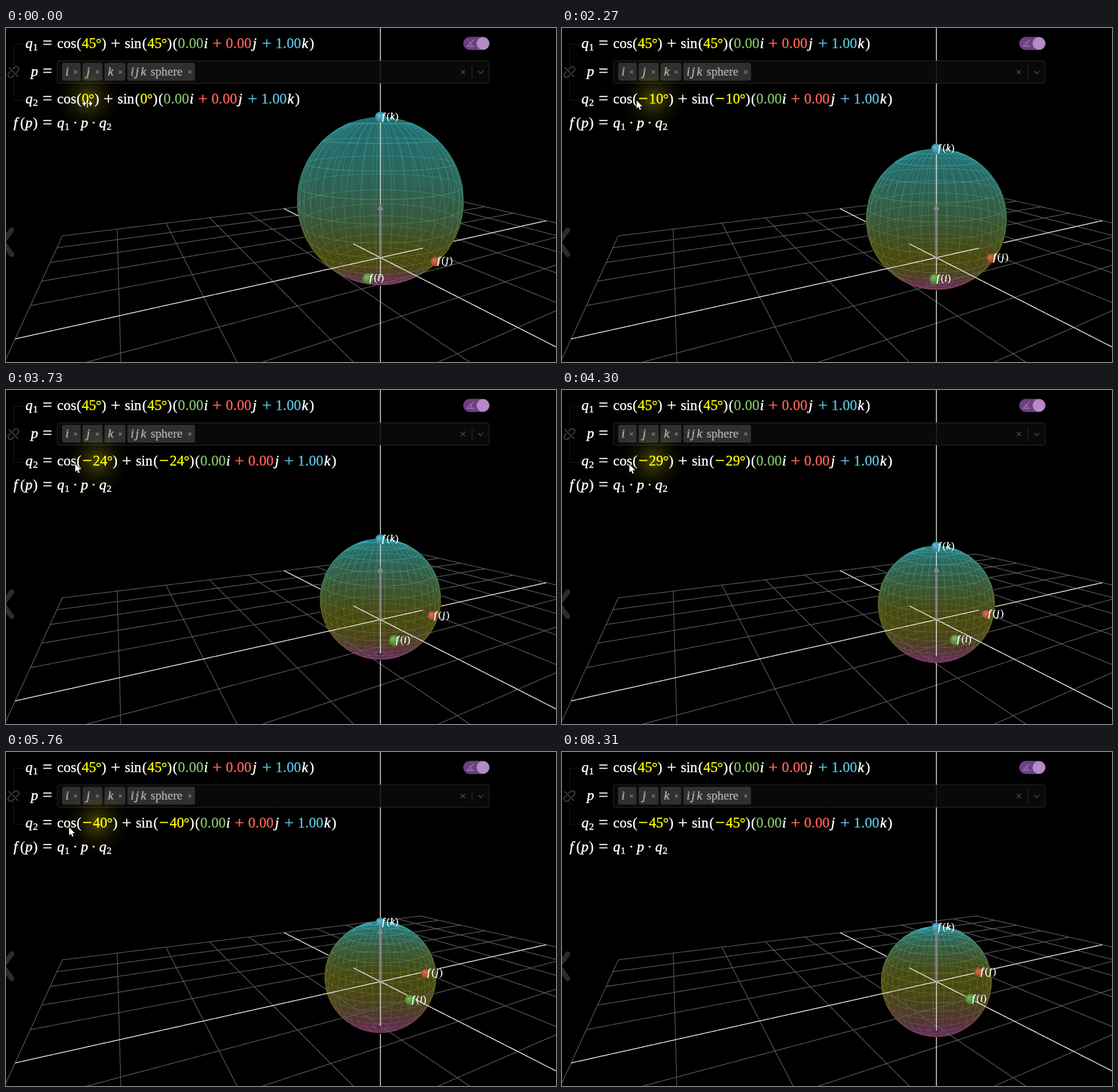
An HTML page with a canvas for the animation above (9060 ms loop, 960 px wide and 584 px high).

```html
<!DOCTYPE html>
<html lang="en">
<head>
<meta charset="utf-8">
<title>Quaternion product on a sphere</title>
<style>
html, body { margin: 0; width: 100%; height: 100%; overflow: hidden; background: #000; }
canvas { display: block; }
</style>
</head>
<body>
<canvas id="stage" width="960" height="584"></canvas>
<script>
const ctx = document.getElementById('stage').getContext('2d');
const LOOP = 9060, LEAVE = 7320, GONE = 8310;
const TAU = Math.PI * 2, RAD = Math.PI / 180;
const SERIF = '"Liberation Serif", serif';
const YELLOW = '#ffff00', GREEN = '#83c167', RED = '#fc6255', BLUE = '#58c4dd', WHITE = '#fff';

const mix = (a, b, u) => a + (b - a) * u;

// The drag: time and degrees turned so far
const DRAG = [[50, 0], [330, 3], [1130, 3], [2270, 10], [3020, 18], [4300, 29], [4910, 35], [6570, 45]];

function turnedAt(t) {
  const k = DRAG.findIndex(key => key[0] > t);
  if (k < 0) return 45;
  if (k === 0) return 0;
  const [t0, d0] = DRAG[k - 1], [t1, d1] = DRAG[k];
  return mix(d0, d1, (t - t0) / (t1 - t0));
}

function pointerAt(t, turned) {
  const x = 137 - turned * 2 / 3, y = 125 + turned * 0.17;
  const u = Math.max(0, Math.min(1, (t - LEAVE) / (GONE - LEAVE)));
  const ease = u * u * (3 - 2 * u);
  return [mix(x, 870, ease), mix(y, 590, ease)];
}

// Camera: orbiting the origin, z axis upright on screen
const CX = 653.5, CY = 401.5, ZOOM = 95.5, NEAR = 0.1445;
const IH = 0.5518, JH = 0.834, SE = 0.337, CE = 0.9415;
const EYE = [IH * CE / NEAR, JH * CE / NEAR, SE / NEAR];

function project([x, y, z]) {
  const side = IH * y - JH * x, toward = IH * x + JH * y;
  const w = ZOOM / (1 - NEAR * (CE * toward + SE * z));
  return [CX + side * w, CY + (SE * toward - CE * z) * w, w];
}

// Adds a sampled curve to the current path, only where keep(point) holds
function trace(curve, n, keep) {
  let pen = false;
  for (let i = 0; i <= n; i++) {
    const p = curve(i / n);
    if (!keep(p)) { pen = false; continue; }
    const [x, y] = project(p);
    if (pen) ctx.lineTo(x, y); else ctx.moveTo(x, y);
    pen = true;
  }
}

function stroke(style, width, draw) {
  ctx.beginPath();
  draw();
  ctx.strokeStyle = style;
  ctx.lineWidth = width;
  ctx.stroke();
}

function line(color, width, ...pts) {
  stroke(color, width, () => pts.forEach(p => ctx.lineTo(...p)));
}

function polygon(color, pts) {
  ctx.beginPath();
  pts.forEach(p => ctx.lineTo(...p));
  ctx.closePath();
  ctx.fillStyle = color;
  ctx.fill();
}

function disc(x, y, r, fill) {
  ctx.beginPath();
  ctx.arc(x, y, r, 0, TAU);
  ctx.fillStyle = fill;
  ctx.fill();
}

// Colour on the sphere: teal at +k, olive on the equator, plum at -k
const TEAL = [38, 120, 124], OLIVE = [76, 78, 20], PLUM = [86, 44, 68];

function tint(z, gain) {
  const end = z > 0 ? TEAL : PLUM, u = Math.abs(z) ** 1.7;
  return `rgb(${OLIVE.map((c, i) => Math.round(mix(c, end[i], u) * gain))})`;
}

function makeSphere(angle) {
  const a = (45 + angle) * RAD, turn = (45 - angle) * RAD;
  const ca = Math.cos(a), sa = Math.sin(a), ct = Math.cos(turn), st = Math.sin(turn);
  const cz = sa / ca, R = 1 / ca;
  const [vx, vy] = EYE, vz = EYE[2] - cz;
  const d = Math.hypot(vx, vy, vz);
  return {
    // q1 p q2, projected stereographically
    map([x, y, z]) {
      const w = 1 - z * sa;
      return [(x * ct - y * st) / w, (x * st + y * ct) / w, z * ca / w];
    },
    facing: ([x, y, z]) => x * vx + y * vy + (z - cz) * vz > R * R,
    // inside the sphere, or not behind it
    visible([x, y, z]) {
      if (x * x + y * y + (z - cz) ** 2 <= R * R * 1.0005) return true;
      const ux = x - vx, uy = y - vy, uz = z - EYE[2];
      const A = ux * ux + uy * uy + uz * uz;
      const B = ux * vx + uy * vy + uz * vz;
      const q = B * B - A * (d * d - R * R);
      return q <= 0 || (-B - Math.sqrt(q)) / A >= 1;
    },
    rim(u) {
      const c = R * R / (d * d), r = R * Math.sqrt(1 - c), h = Math.hypot(vx, vy);
      const co = Math.cos(u * TAU) * r, si = Math.sin(u * TAU) * r / d;
      return [vx * c - JH * co - IH * vz * si, vy * c + IH * co - JH * vz * si, cz + vz * c + h * si];
    }
  };
}

function drawSphere(s) {
  const ys = Array.from({ length: 64 }, (_, i) => project(s.rim(i / 64))[1]);
  const top = Math.min(...ys), bottom = Math.max(...ys);
  const shade = gain => {
    const g = ctx.createLinearGradient(0, top, 0, bottom);
    for (let i = 0; i <= 16; i++) {
      const z = Math.cos(i * Math.PI / 16), y = project(s.map([0, 0, z]))[1];
      g.addColorStop(Math.max(0, Math.min(1, (y - top) / (bottom - top))), tint(z, gain));
    }
    return g;
  };
  ctx.beginPath();
  trace(s.rim, 120, () => true);
  ctx.fillStyle = shade(0.92);
  ctx.fill();

  const LATS = 20, LONS = 40, lines = shade(1.8);
  const at = (lat, lon) => s.map([Math.sin(lat) * Math.cos(lon), Math.sin(lat) * Math.sin(lon), Math.cos(lat)]);
  const mesh = (alpha, keep) => {
    ctx.globalAlpha = alpha;
    stroke(lines, 1, () => {
      for (let i = 1; i < LATS; i++) trace(u => at(i * Math.PI / LATS, u * TAU), 90, keep);
    });
    ctx.globalAlpha = alpha * 0.7;
    stroke(lines, 1, () => {
      for (let i = 0; i < LONS; i++) trace(u => at(mix(0.05, 0.97, u) * Math.PI, i * TAU / LONS), 50, keep);
    });
    ctx.globalAlpha = 1;
  };
  mesh(0.35, p => !s.facing(p));
  mesh(0.5, s.facing);
}

function drawFloor(s) {
  const span = u => u * 10 - 5;
  stroke('#5e5d64', 1.2, () => {
    for (let n = -5; n <= 5; n++) {
      if (!n) continue;
      trace(u => [n, span(u), 0], 400, s.visible);
      trace(u => [span(u), n, 0], 400, s.visible);
    }
  });
  stroke('#e6e6e2', 1.5, () => {
    trace(u => [span(u), 0, 0], 400, s.visible);
    trace(u => [0, span(u), 0], 400, s.visible);
    trace(u => [0, 0, u * 8 - 4], 400, s.visible);
  });
  // unit arrow along k
  const tip = project([0, 0, 1])[1];
  line('#85808c', 4, [CX, CY], [CX, tip + 9]);
  polygon('#8b8695', [[CX, tip], [CX + 5, tip + 11], [CX - 5, tip + 11]]);
}

function drawBall(p, light, dark) {
  const [x, y, w] = project(p), r = 0.087 * w;
  const g = ctx.createRadialGradient(x - r * 0.3, y - r * 0.35, 0, x, y, r);
  g.addColorStop(0, light);
  g.addColorStop(1, dark);
  disc(x, y, r, g);
}

function drawLabel(p, name) {
  const [x, y] = project(p);
  math(x + 0.5, y + 4, 16.2, [`f(${name})`, WHITE]);
}

// Advances in em where TeX differs from the font
const ADV = { sin: 1.228, sphere: 2.786, ' ': 0.222, '.': 0.278, '(': 0.389, ')': 0.389, '°': 0.352,
  i: 0.345, j: 0.469, k: 0.552, f: 0.598 };
const OPERATOR = /[+=−]/, LETTER = /^[ijkpqf]$/, SUBS = '₁₂';

const glyphs = text => text.match(/cos|sin|sphere|./g);

function advance(g, size) {
  if (OPERATOR.test(g)) return 0.778 * size;
  if (ADV[g]) return ADV[g] * size;
  if (SUBS.includes(g)) return 0.38 * size;
  ctx.font = `${size}px ${SERIF}`;
  return ctx.measureText(g).width;
}

const mathWidth = (text, size) => glyphs(text).reduce((sum, g) => sum + advance(g, size), 0);

// Sets a line of mathematics from [text, color] parts
function math(x, y, size, ...parts) {
  ctx.textAlign = 'center';
  for (const [text, color] of parts) {
    for (const g of glyphs(text)) {
      const adv = advance(g, size), mid = x + adv / 2;
      const sub = SUBS.indexOf(g) + 1, letter = LETTER.test(g), operator = OPERATOR.test(g);
      const scale = sub ? 0.7 : operator ? 1.2 : 1;
      const base = y + size * (sub ? 0.15 : operator ? 0.055 : 0);
      ctx.font = `${letter ? 'italic ' : ''}${size * scale}px ${SERIF}`;
      ctx.fillStyle = ctx.strokeStyle = color;
      ctx.lineWidth = letter ? 0.6 : 0.4;
      ctx.fillText(sub || g, mid, base);
      ctx.strokeText(sub || g, mid, base);
      x += adv;
    }
  }
}

const EM = 25, LEFT = 89.3;

function equation(y, name, ...right) {
  const x = LEFT - 1.07 * EM;
  math(x - 0.26 * EM - mathWidth(name, EM), y, EM, [name, WHITE]);
  math(x, y, EM, ['=', WHITE]);
  math(LEFT, y, EM, ...right);
}

function product(y, name, angle) {
  equation(y, name, ['cos(', WHITE], [angle, YELLOW], [') + sin(', WHITE], [angle, YELLOW], [')(', WHITE],
    ['0.00', GREEN], ['i ', WHITE], ['+ 0.00', RED], ['j ', WHITE], ['+ 1.00', BLUE], ['k)', WHITE]);
}

function box(x, y, w, h, r, fill, edge = fill) {
  ctx.beginPath();
  ctx.roundRect(x, y, w, h, r);
  ctx.fillStyle = fill;
  ctx.fill();
  ctx.strokeStyle = edge;
  ctx.lineWidth = 1;
  ctx.stroke();
}

function cross(x, y, r, color, width) {
  line(color, width, [x - r, y - r], [x + r, y + r]);
  line(color, width, [x + r, y - r], [x - r, y + r]);
}

function drawPicker() {
  box(89.5, 57.5, 754, 39, 3, 'rgba(11,11,14,0.85)', '#2b2b1c');
  const size = 21.3;
  let x = 98;
  for (const name of ['i', 'j', 'k', 'ijk sphere']) {
    const w = mathWidth(name, size) + 25;
    box(x + 0.5, 61.5, w - 1, 30, 2, '#303030');
    math(x + 5, 83, size, [name, '#a9a9a9']);
    cross(x + w - 9, 77, 2.6, '#8c8c8c', 1.2);
    x += w + 3.2;
  }
  cross(797.5, 77, 3.6, '#45454a', 1.5);
  line('#2c2c2e', 1, [813.5, 65], [813.5, 89]);
  line('#45454a', 1.6, [824, 75], [828.5, 79.5], [833, 75]);
}

function drawToggle() {
  box(798.5, 16, 45, 22, 11, '#6b4180');
  disc(832.5, 27, 11, '#b58ac6');
  line('#a878ba', 1.3, [816, 21], [805, 32], [817, 32]);
  stroke('#a878ba', 1.1, () => ctx.arc(805, 32, 8, -1.15, 0.15));
}

function drawSideMarks() {
  ctx.save();
  ctx.setLineDash([1, 2]);
  line('#4a4a4a', 1, [36, 28.5], [13.5, 28.5], [13.5, 66]);
  line('#4a4a4a', 1, [13.5, 88], [13.5, 126.5], [36, 126.5]);
  ctx.setLineDash([]);
  ctx.lineCap = 'round';
  line('#2b2b2e', 9, [10, 353], [-6, 374.5], [10, 396]);

  // broken link
  ctx.translate(13, 77);
  ctx.rotate(-Math.PI / 4);
  line('#3b3b3b', 2, [0, -11], [0, 11]);
  for (let half = 0; half < 2; half++) {
    stroke('#3b3b3b', 2.2, () => {
      ctx.moveTo(3, -4.5);
      ctx.arc(7, 0, 4.5, -Math.PI / 2, Math.PI / 2);
      ctx.lineTo(3, 4.5);
    });
    ctx.rotate(Math.PI);
  }
  ctx.restore();
}

function drawGlow(angle) {
  const x = LEFT + mathWidth('cos(', EM) + mathWidth(angle, EM) / 2, y = 124, r = 62;
  const g = ctx.createRadialGradient(x, y, 0, x, y, r);
  for (let u = 0; u <= 1; u += 0.125) g.addColorStop(u, `rgba(255,245,20,${0.3 * (1 - u) ** 2})`);
  disc(x, y, r, g);
}

function drawPointer(x, y, resize) {
  ctx.save();
  ctx.translate(x, y);
  ctx.lineJoin = 'round';
  const shape = (...pts) => {
    line('#111', 1.6, ...pts, pts[0]);
    polygon(WHITE, pts);
  };
  if (resize) {
    ctx.translate(5, 7);
    for (const s of [-1, 1]) shape([9 * s, 0], [4 * s, -5], [4 * s, -1], [2 * s, -1], [2 * s, 1], [4 * s, 1], [4 * s, 5]);
    line(WHITE, 1.4, [0, -7], [0, 7]);
  } else {
    shape([0, 0], [0, 14], [3.2, 11], [5.5, 16.2], [7.6, 15.3], [5.4, 10.2], [9.9, 10.2]);
  }
  ctx.restore();
}

const BALLS = [
  { name: 'k', at: [0, 0, 1], light: '#63bfd6', dark: '#2f8296' },
  { name: 'j', at: [0, 1, 0], light: '#e0744f', dark: '#984630' },
  { name: 'i', at: [1, 0, 0], light: '#86bd5e', dark: '#47782f' }
];

function render(t) {
  const turned = turnedAt(t), sphere = makeSphere(-turned);
  ctx.fillStyle = '#000';
  ctx.fillRect(0, 0, 960, 584);

  drawSphere(sphere);
  drawFloor(sphere);
  for (const b of BALLS) drawBall(sphere.map(b.at), b.light, b.dark);
  for (const b of BALLS) drawLabel(sphere.map(b.at), b.name);

  drawSideMarks();
  drawPicker();
  drawToggle();

  const n = Math.round(turned), angle = `${n ? '−' : ''}${n}°`;
  if (t < LEAVE) drawGlow(angle);
  product(35, 'q₁', '45°');
  equation(84, 'p');
  product(132, 'q₂', angle);
  equation(174, 'f(p)', ['q₁ · p · q₂', WHITE]);
  drawPointer(...pointerAt(t, turned), turned < 7);
}

const start = performance.now();
function tick() {
  render((performance.now() - start) % LOOP);
  requestAnimationFrame(tick);
}
tick();
</script>
</body>
</html>
```
